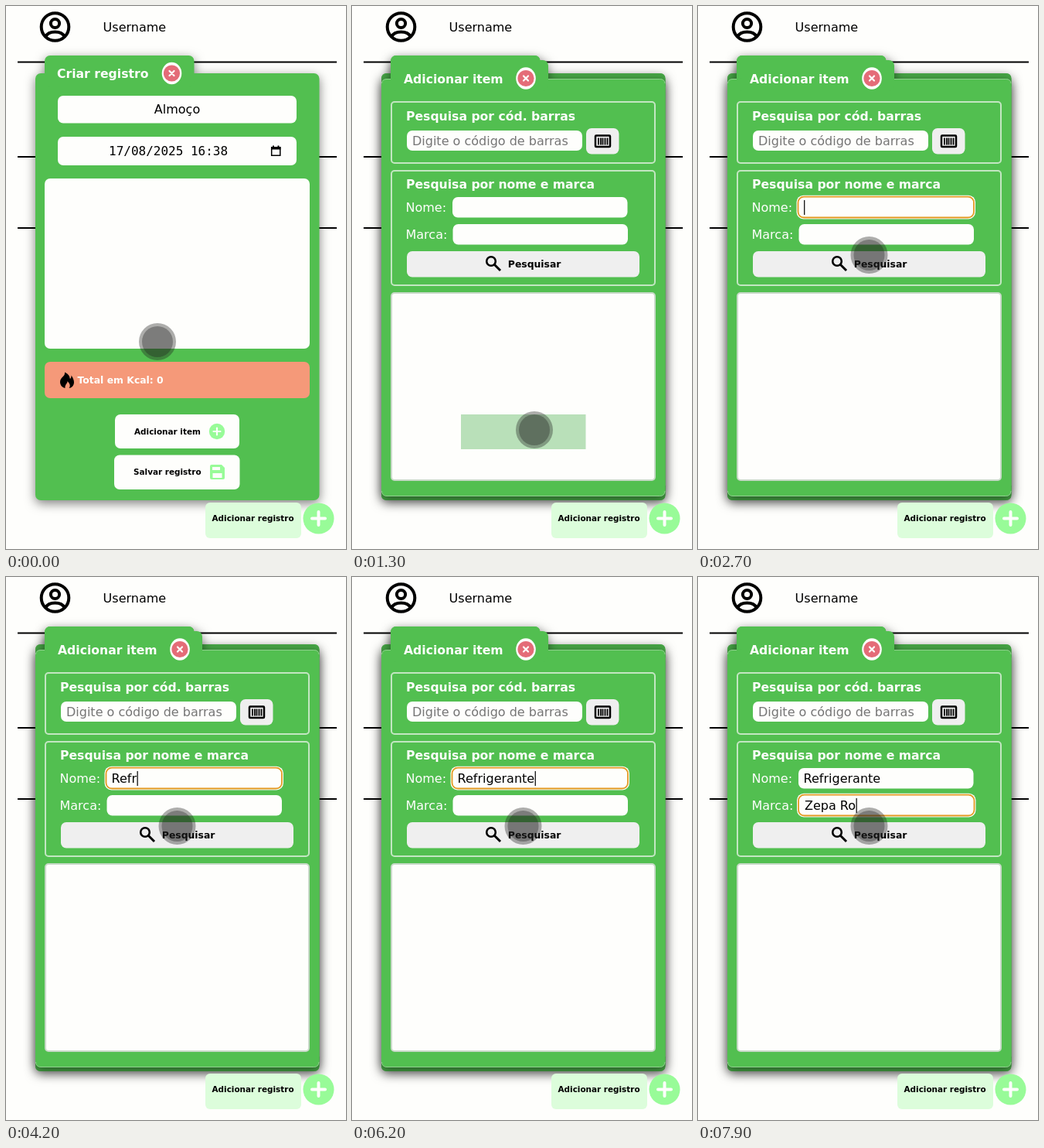
An HTML page for the animation above (8000 ms loop, 440 by 702 pixels).

```html
<!DOCTYPE html>
<html lang="pt-BR">
<head>
<meta charset="utf-8">
<title>Criar registro</title>
<style>
html, body { margin: 0; width: 100%; height: 100%; overflow: hidden; background: #fefefc; }
svg { display: block; width: 440px; height: 702px; }
text { font: 16px "DejaVu Sans", sans-serif; white-space: pre; }
.title { font-weight: bold; font-size: 15.65px; }
.mid { font-weight: bold; font-size: 12.4px; }
.small { font-weight: bold; font-size: 10.45px; }
.mono { font-family: "DejaVu Sans Mono", monospace; }
.w { fill: #fefefc; }
.btn { fill: #efefef; }
.mint { fill: #98fb98; }
.hint { fill: #757575; }
.modal { fill: #52bf50; }
.shade { filter: drop-shadow(0 4px 7px rgba(0, 0, 0, .5)); }
.frame { fill: none; stroke: #c3e6c2; stroke-width: 2; }
.line { fill: none; stroke: #000; }
.cross { fill: none; stroke: #fefefc; stroke-linecap: round; }
</style>
</head>
<body>
<svg viewBox="0 0 440 702">
  <defs>
    <g id="close">
      <ellipse class="w" rx="12.8" ry="14.3"/>
      <circle r="10.6" fill="#e46c78"/>
      <path class="cross" stroke-width="2.2" d="M-3 -3L3 3M3 -3L-3 3"/>
    </g>
  </defs>

  <!-- page -->
  <g class="line" stroke-width="4">
    <circle cx="63.5" cy="27" r="17.8"/>
    <circle cx="63.5" cy="22.5" r="5.6"/>
    <path d="M51.5 39.5C55 31.5 72 31.5 75.5 39.5"/>
  </g>
  <text x="125.6" y="33">Username</text>
  <path class="line" stroke-width="2" d="M15 72.5H428M15 195H428M15 287H428"/>

  <!-- record dialog -->
  <g class="modal shade">
    <rect x="38" y="87" width="367.5" height="552" rx="7"/>
    <rect x="50" y="64" width="193.5" height="40" rx="7"/>
  </g>
  <g id="record">
    <text class="title w" x="66" y="93">Criar registro</text>
    <use href="#close" x="214.5" y="87"/>
    <rect class="w" x="67" y="116" width="309" height="35.5" rx="7"/>
    <text x="221.5" y="139" text-anchor="middle">Almoço</text>
    <rect class="w" x="67" y="169" width="309" height="37" rx="7"/>
    <text class="mono" x="133" y="193">17/08/2025 16:38</text>
    <path class="line" stroke-width="1.5" d="M343.7 183H354.8V193.3H343.7Z"/>
    <path d="M343 182H355.5V185.5H343ZM345 180.5h2v2h-2ZM351.5 180.5h2v2h-2Z"/>
    <rect class="w" x="50" y="223" width="343" height="220" rx="7"/>
    <rect x="50" y="460" width="343" height="47" rx="7" fill="#f59979"/>
    <path d="M76 473.5C83 477 82 480 83 482C84.500 481 84.500 479 84.500 477.500C87 481 88 484 88 486.500C88 491 84.500 494 81.500 494C84 491 82.500 488 79.500 485C80 488 76 489 76.500 494C72 493 70 489.500 70 486C70 480 77 479 76 473.500Z"/>
    <text class="mid w" x="92.500" y="487.500">Total em Kcal: 0</text>
    <rect class="w" x="141" y="528" width="161" height="44" rx="7"/>
    <text class="small" x="166" y="554">Adicionar item</text>
    <circle class="mint" cx="273" cy="550" r="10.2"/>
    <path class="cross" stroke-width="2.2" d="M268.500 550H277.500M273 545.500V554.500"/>
    <rect class="w" x="140" y="580.500" width="162.500" height="44.500" rx="7"/>
    <text class="small" x="165" y="606">Salvar registro</text>
    <path class="mint" d="M266 593H279L283 597V610Q283 612 281 612H266Q264 612 264 610V595Q264 593 266 593Z"/>
    <path class="w" d="M267 596H277V600H267ZM267.500 604H279.500V610H267.500Z"/>
  </g>

  <!-- item dialog -->
  <g id="item">
    <g fill="#47a646">
      <path d="M38 104V94Q38 87 45 87H398.500Q405.500 87 405.500 94V104Z"/>
      <path d="M38 620V632Q38 639 45 639H398.500Q405.500 639 405.500 632V620Z"/>
    </g>
    <g class="modal shade">
      <rect x="38" y="94" width="367.500" height="539.500" rx="7"/>
      <rect x="50" y="70" width="204" height="40" rx="7"/>
    </g>
    <path fill="none" stroke="#8fd08d" d="M38.500 100Q39 94.500 45 94.500H50M254 94.500H398.500Q404.500 94.500 405 100M38.500 627Q39 633.500 45 633.500H398.500Q404.500 633.500 405 627"/>
    <rect class="modal" x="50" y="64" width="193.500" height="30" rx="7"/>
    <text class="title w" x="67" y="100">Adicionar item</text>
    <use href="#close" x="225" y="93.500"/>

    <rect class="frame" x="51" y="124" width="341" height="79" rx="4"/>
    <text class="title w" x="70" y="148">Pesquisa por cód. barras</text>
    <rect class="w" x="71" y="161" width="227" height="26" rx="7"/>
    <text class="hint" x="78" y="180">Digite o código de barras</text>
    <rect class="btn" x="303" y="158" width="42.500" height="33.500" rx="7"/>
    <rect class="line" stroke-width="2.500" x="315" y="167.500" width="19" height="14.500" rx="1"/>
    <path class="line" stroke-width="1.800" d="M319 170.500V179.500M322 170.500V179.500M324.500 170.500V179.500M327.500 170.500V179.500M330.500 170.500V179.500"/>

    <rect class="frame" x="51" y="213" width="341" height="148" rx="4"/>
    <text class="title w" x="70" y="236">Pesquisa por nome e marca</text>
    <text class="w" x="69.500" y="266">Nome:</text>
    <text class="w" x="69.500" y="301">Marca:</text>
    <rect class="w" x="130" y="247" width="226.500" height="26.500" rx="7"/>
    <rect class="w" x="130.500" y="282" width="226.500" height="26.500" rx="7"/>
    <g id="focus">
      <rect class="w" x="127.500" y="244.700" width="231.500" height="30.800" rx="9"/>
      <rect fill="none" stroke="#e39a22" stroke-width="1.800" x="129.500" y="246.700" width="227.500" height="26.800" rx="7.500"/>
    </g>
    <text id="name" x="136.600" y="266"></text>
    <text id="brand" x="138" y="301"></text>
    <rect id="caret" width="1.200" height="19"/>

    <rect class="btn" x="71" y="317" width="301" height="33.500" rx="7"/>
    <circle class="line" stroke-width="2.600" cx="180" cy="330" r="5.800"/>
    <path class="line" stroke-width="3" d="M184 334L192 342"/>
    <text class="mid" x="201.800" y="338">Pesquisar</text>
    <rect class="w" x="51" y="371" width="341" height="242" rx="4" stroke="#c8d9c8" stroke-width="2"/>
    <rect id="ghost" x="141" y="528" width="161.500" height="45" fill="#b9e0b9"/>
  </g>

  <!-- floating button -->
  <rect x="258" y="642" width="124" height="46" rx="6" fill="#dcfddb"/>
  <text class="small" x="266.500" y="666">Adicionar registro</text>
  <circle class="mint" cx="404.500" cy="662.500" r="20"/>
  <path class="cross" stroke-width="4" d="M396 662.500H413M404.500 654V671"/>

  <g id="touch">
    <circle r="24" fill="rgba(30,30,30,.36)"/>
    <circle r="20" fill="rgba(30,30,30,.34)"/>
  </g>
</svg>
<script>
const $ = id => document.getElementById(id);
const LOOP = 8000, OPEN = 1100, FOCUS = 2300, NEXT = 6300;
const name = { el: $('name'), text: 'Refrigerante',
  keys: [3100, 3400, 3800, 4200, 4500, 4900, 5300, 5300, 5400, 5600, 5700, 5900] };
const brand = { el: $('brand'), text: 'Zepa Ro',
  keys: [6600, 6900, 7100, 7300, 7500, 7700, 7900] };
// time, x, y
const path = [[0, 196, 434], [100, 196, 434], [800, 236, 548], [1500, 236, 548],
  [2150, 222, 262], [2350, 222, 262], [2650, 221.5, 322], [LOOP, 221.5, 322]];

const show = (id, on) => $(id).style.display = on ? '' : 'none';
const move = (id, x, y) => $(id).setAttribute('transform', `translate(${x} ${y})`);
const type = (f, t) => f.el.textContent = f.text.slice(0, f.keys.filter(k => k <= t).length);

function touchAt(t) {
  const i = path.findIndex(p => p[0] > t);
  const [t0, x0, y0] = path[i - 1], [t1, x1, y1] = path[i];
  const p = (t - t0) / (t1 - t0), e = p * p * (3 - 2 * p);
  return [x0 + (x1 - x0) * e, y0 + (y1 - y0) * e];
}

function draw(t) {
  show('record', t < OPEN);
  show('item', t >= OPEN);
  show('ghost', t < 1800);
  $('ghost').style.opacity = Math.min(1, (1800 - t) / 400);
  type(name, t);
  type(brand, t);

  const onBrand = t >= NEXT, field = onBrand ? brand : name;
  show('focus', t >= FOCUS);
  show('caret', t >= FOCUS);
  move('focus', onBrand ? 0.5 : 0, onBrand ? 35 : 0);
  const width = field.el.textContent ? field.el.getComputedTextLength() : 0;
  move('caret', +field.el.getAttribute('x') + width + 0.5, onBrand ? 286 : 251);
  move('touch', ...touchAt(t));
}

function tick() {
  draw(performance.now() % LOOP);
  requestAnimationFrame(tick);
}
tick();
</script>
</body>
</html>
```
